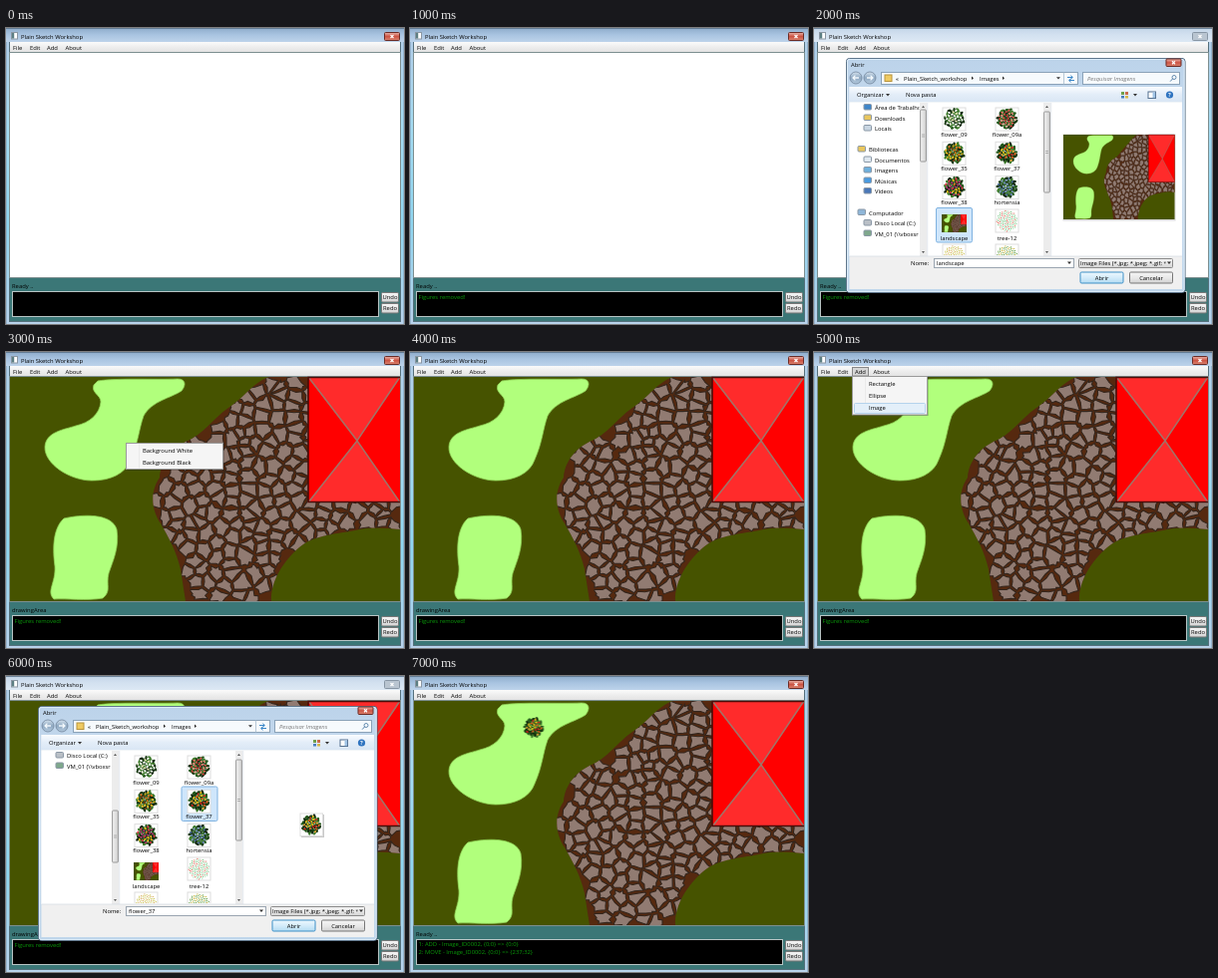
An HTML page that plays this animation: 399 px wide and 297 px high, repeating every 8 s.

```html
<!DOCTYPE html>
<html lang="pt">
<head>
<meta charset="utf-8">
<title>Canvas editor</title>
<style>
html, body { margin: 0; width: 100%; height: 100%; overflow: hidden; background: #b9d1ea; }
svg { display: block; width: 399px; height: 297px; }
text { font: 5.85px "Open Sans", "Noto Sans", sans-serif; fill: #000; white-space: pre; }
.mid { text-anchor: middle; }
.log text { fill: #0a9a0a; }
.step { animation: 8s step-end infinite; }
.modal { animation-name: modal; }
.first { animation-name: first; }
.second { animation-name: second; }
.scene { animation-name: scene; }
.context { animation-name: context; }
.menu { animation-name: menu; }
.ready { animation-name: ready; }
.area { animation-name: area; }
.removed { animation-name: removed; }
.moved { animation-name: moved; }
@keyframes modal { 0%, 37.5%, 87.5%, 100% { opacity: 0 } 25%, 75% { opacity: 1 } }
@keyframes first { 0%, 37.5%, 100% { opacity: 0 } 25% { opacity: 1 } }
@keyframes second { 0%, 87.5%, 100% { opacity: 0 } 75% { opacity: 1 } }
@keyframes scene { 0% { opacity: 0 } 37.5%, 100% { opacity: 1 } }
@keyframes context { 0%, 50%, 100% { opacity: 0 } 37.5% { opacity: 1 } }
@keyframes menu { 0%, 75%, 100% { opacity: 0 } 62.5% { opacity: 1 } }
@keyframes ready { 0%, 87.5%, 100% { opacity: 1 } 37.5% { opacity: 0 } }
@keyframes area { 0%, 87.5%, 100% { opacity: 0 } 37.5% { opacity: 1 } }
@keyframes removed { 0%, 87.5%, 100% { opacity: 0 } 12.5% { opacity: 1 } }
@keyframes moved { 0% { opacity: 0 } 87.5%, 100% { opacity: 1 } }
</style>
</head>
<body>
<svg id="stage" viewBox="0 0 399 297"></svg>
<script>
const rng = seed => () => (seed = (seed * 16807) % 2147483647) / 2147483647;
const each = (list, fn) => list.map(fn).join('');
const rect = (x, y, w, h, fill, stroke = 'none', more = '') =>
  `<rect x="${x}" y="${y}" width="${w}" height="${h}" fill="${fill}" stroke="${stroke}" ${more}/>`;
const path = (d, fill, stroke = 'none', width = 1) =>
  `<path d="${d}" fill="${fill}" stroke="${stroke}" stroke-width="${width}"/>`;
const text = (x, y, s, more = '') => `<text x="${x}" y="${y}" ${more}>${s}</text>`;
const group = (names, body) => `<g class="${names}">${body}</g>`;
const step = (name, body) => group('step ' + name, body);
const gradient = (id, stops, flat) =>
  `<linearGradient id="${id}" ${flat ? '' : 'x2="0" y2="1"'}>` +
  each(stops, (c, i) => `<stop offset="${i / (stops.length - 1)}" stop-color="${c}"/>`) + '</linearGradient>';
const arrow = (x, y, fill = '#333') => path(`M${x} ${y}h4l-2 2.4z`, fill);
const right = (x, y) => path(`M${x} ${y}l2 1.7l-2 1.7z`, '#222');
const button = (x, y, w, h, label, edge = '#777') =>
  rect(x, y, w, h, 'url(#button)', edge, 'rx="1.2"') + text(x + w / 2, y + h / 2 + 2.1, label, 'class="mid"');
const cross = (x, y, c) => path(`M${x - 1.5} ${y - 1.5}l3 3m0 -3l-3 3`, 'none', c, 1.1);
const closeBox = (x, y, w, h, fill, edge) =>
  rect(x, y, w, h, fill, edge, 'rx="1"') + cross(x + w / 2, y + h / 2, '#fff');

const road = 'M264 25C248 30 240 45 223 56C207 67 198 83 180 90C166 97 155 110 154 126' +
  'C143 142 147 160 155 172C163 186 171 200 175 218L180 250H266C265 230 278 210 294 196' +
  'C308 184 328 183 350 179C366 175 382 177 395 178V25Z';

// Paving: shrunken Voronoi cells on a jittered grid, with chipped edges
function stones() {
  const rand = rng(77), pts = [];
  const ctx = document.createElement('canvas').getContext('2d'), area = new Path2D(road);
  for (let row = 0; row < 21; row++)
    for (let col = 0; col < 17; col++)
      pts.push([142 + col * 16 + (row % 2) * 8 + (rand() - .5) * 14, 20 + row * 11.8 + (rand() - .5) * 10]);
  const cut = (poly, nx, ny, d) => poly.flatMap((p, i) => {
    const q = poly[(i + 1) % poly.length];
    const a = p[0] * nx + p[1] * ny - d, b = q[0] * nx + q[1] * ny - d, t = a / (a - b);
    const out = a <= 0 ? [p] : [];
    if (a * b < 0) out.push([p[0] + (q[0] - p[0]) * t, p[1] + (q[1] - p[1]) * t]);
    return out;
  });
  const chip = (poly, x, y) => poly.flatMap((p, i) => {
    const q = poly[(i + 1) % poly.length], out = [[p[0] + rand() - .5, p[1] + rand() - .5]];
    if (Math.hypot(q[0] - p[0], q[1] - p[1]) > 4) {
      const t = .3 + rand() * .4, pull = rand() * .3;
      const mx = p[0] + (q[0] - p[0]) * t, my = p[1] + (q[1] - p[1]) * t;
      out.push([mx + (x - mx) * pull, my + (y - my) * pull]);
    }
    return out;
  });
  return each(pts, ([x, y]) => {
    if (!ctx.isPointInPath(area, x, y)) return '';
    let cell = [[x - 11, y - 10], [x + 11, y - 10], [x + 11, y + 10], [x - 11, y + 10]];
    for (const [u, v] of pts) {
      const dx = u - x, dy = v - y, len = Math.hypot(dx, dy);
      if (!len || len > 40) continue;
      const nx = dx / len, ny = dy / len;
      cell = cut(cell, nx, ny, x * nx + y * ny + len / 2 - 1);
    }
    return cell.length > 2 ? 'M' + chip(cell, x, y).map(p => p.map(n => n.toFixed(1))).join('L') + 'Z' : '';
  });
}

function landscape() {
  return rect(4, 25, 391, 225, '#465300') +
    path('M92 29C110 26 150 28 172 27C180 27 181 33 176 39C166 46 146 49 138 64C133 78 133 90 125 108' +
      'C120 122 105 129 86 129C64 129 38 112 39 95C40 80 58 78 70 74C84 71 94 62 95 50C95 43 85 41 88 33Z',
      '#b1ff7c', '#8fcf55', .8) +
    path('M58 167C75 163 106 161 111 178C114 196 107 210 103 222C100 234 106 240 97 247C80 250 60 247 48 248' +
      'C40 240 50 232 49 215C47 200 46 178 58 167Z', '#b1ff7c', '#8fcf55', .8) +
    path(road, '#56290f') +
    `<g clip-path="url(#road)">${path(stones(), '#917b72', '#33251c', 1.1)}</g>` +
    rect(303, 25, 92, 126, '#f00') +
    path('M303 25H395L352 89ZM303 151H395L352 89Z', '#ff2b2b') +
    path('M303 25L352 89L395 25M303 151L352 89L395 151', 'none', '#a07468', 1.5) +
    path('M395 25.5H303V150.5H395', 'none', '#4a0c08', 1.6);
}
const scaled = (x, y, w, h) =>
  `<use href="#land" transform="translate(${x} ${y}) scale(${w / 391} ${h / 225}) translate(-4 -25)"/>`;

function flower(x, y, size, colors, seed) {
  const rand = rng(seed * 9973), blob = (n, reach, r, list) => {
    let out = '';
    for (let i = 0; i < n; i++) {
      const a = i * 2.4, d = Math.sqrt((i + .5) / n) * reach, c = list[Math.floor(rand() * list.length)];
      out += `<ellipse rx="${r}" ry="${r * .6}" fill="${c}" transform="translate(${(Math.cos(a) * d).toFixed(2)} ` +
        `${(Math.sin(a) * d).toFixed(2)}) rotate(${Math.round(rand() * 180)})"/>`;
    }
    return out;
  };
  return `<g transform="translate(${x} ${y}) scale(${size / 20})">` +
    blob(46, 9, 1.9, ['#16380f', '#24591b', '#0d260b', '#3c7a2a']) +
    blob(26, 8, 1.3, colors) + '</g>';
}

function tree(x, y, colors) {
  const rand = rng(515);
  let out = '';
  for (let i = 0; i < 110; i++) {
    const a = i * 2.4, d = Math.sqrt(i / 110) * 10.5;
    out += `<circle cx="${(x + Math.cos(a) * d).toFixed(1)}" cy="${(y + Math.sin(a) * d).toFixed(1)}" r=".6" ` +
      `fill="${colors[rand() < .3 ? 0 : 1]}"/>`;
  }
  return out;
}

const mixed = ['#f2c21b', '#e8601c', '#d1201c', '#1c4a14', '#e8a030'];
const thumbs = [
  ['flower_09', ['#fff', '#f6f2e4', '#efe6b8', '#fff']],
  ['flower_09a', ['#e05a50', '#f08a7c', '#c93a38', '#f4b0a4']],
  ['flower_35', ['#f2b91b', '#e0701c', '#c8a81c', '#7a3a14']],
  ['flower_37', mixed],
  ['flower_38', ['#e0344a', '#f2c21b', '#b02a70', '#e8781c']],
  ['hortensia', ['#5f7fae', '#7e97c2', '#48679a', '#4f7d4a']]
];
const colX = i => i % 2 ? 193.5 : 140.5;
const rowY = i => 91 + Math.floor(i / 2) * 34.3;

const files = () =>
  each(thumbs, ([name, colors], i) =>
    rect(colX(i) - 11.5, rowY(i) - 11, 23, 23, '#fff', '#ddd') +
    flower(colX(i), rowY(i), 22, colors, i + 3) +
    text(colX(i), rowY(i) + 17.8, name, 'class="mid"')) +
  scaled(128, 187, 25, 18) + text(140.5, 212.8, 'landscape', 'class="mid"') +
  rect(182, 182, 23, 23, '#fff', '#ddd') + tree(193.5, 193.5, ['#e06a5a', '#7cc98a']) +
  text(193.5, 212.8, 'tree-12', 'class="mid"') +
  `<g clip-path="url(#list)">${rect(129, 217, 23, 23, '#fff', '#ddd') + rect(182, 217, 23, 23, '#fff', '#ddd') +
    tree(140.5, 229, ['#d6a85a', '#c9c24a']) + tree(193.5, 229, ['#c9b030', '#5c9a3c'])}</g>`;

const scrollbar = (x, y, h, from, to) =>
  rect(x, y, 7, h, '#ececec') + path(`M${x + 2} ${y + 5}l1.5 -2l1.5 2zM${x + 2} ${y + h - 5}l1.5 2l1.5 -2z`, '#555') +
  rect(x + .6, from, 5.8, to - from, 'url(#thumb)', '#999', 'rx="1"') +
  path(`M${x + 2} ${(from + to) / 2 - 1}h3m-3 2h3`, 'none', '#777', .5);

const entry = ([label, x, y, color]) =>
  rect(x - 11, y - 5.5, 7.5, 5.5, color, '#8a97a5', 'rx="1"') + text(x, y, label);
const places = [
  ['Área de Trabalho', 61, 82, '#3f86c9'], ['Downloads', 61, 92.5, '#e9c65e'], ['Locais', 61, 103, '#c9d6e2'],
  ['Bibliotecas', 55, 124, '#e9c65e'], ['Documentos', 61, 134.5, '#dfe8f0'], ['Imagens', 61, 145, '#6fb0dd'],
  ['Músicas', 61, 155.5, '#4a9be0'], ['Vídeos', 61, 166, '#4a78b8'],
  ['Computador', 55, 187.5, '#8fb6d8'], ['Disco Local (C:)', 61, 198, '#b9bfc6'], ['VM_01 (\\\\vboxsr', 61, 208.5, '#7fa88c']
];
const drives = [['Disco Local (C:)', 61, 82, '#b9bfc6'], ['VM_01 (\\\\vboxsr', 61, 92.5, '#7fa88c']];
const picked = (x, y) => rect(x, y, 36, 34.5, '#cfe6fb', '#7fb2e0', 'rx="1.5"');
const sidebar = list => `<g clip-path="url(#side)">${each(list, entry)}</g>`;

const dialog = () =>
  rect(32.5, 30.5, 339.5, 235, 'url(#glass)', '#3f5870', 'rx="3"') +
  rect(33.3, 31.3, 337.9, 233.4, 'none', '#e2f0fb', 'rx="2.5"') +
  text(37, 39, 'Abrir') + closeBox(353, 31, 15, 7.5, 'url(#red)', '#6b2b25') +
  each([42, 56], x => `<circle cx="${x}" cy="50" r="6" fill="url(#round)" stroke="#71869c" stroke-width=".8"/>`) +
  path('M45 50h-6m2.4 -2.4l-2.4 2.4l2.4 2.4M53 50h6m-2.4 -2.4l2.4 2.4l-2.4 2.4', 'none', '#f4f9fd', 1.3) +
  rect(67.5, 44.5, 197, 12, '#f6fafd', '#8aa2b8') +
  rect(71, 47, 7, 6.5, '#efca62', '#b8933a') + text(82, 52.5, '«') +
  text(90, 52.5, 'Plain_Sketch_workshop') + right(158, 48.6) + text(166, 52.5, 'Images') + right(189, 48.6) +
  arrow(243, 49.2) + path('M250.5 44.5v12', 'none', '#a9bccd', .8) +
  path('M254 49.5h5m-1.6 -1.8l2 1.8l-2 1.8M261 52.5h-5m1.6 -1.8l-2 1.8l2 1.8', 'none', '#3a86c8', 1) +
  rect(269.5, 44.5, 97, 12, '#f6fafd', '#8aa2b8') +
  text(274, 52.5, 'Pesquisar Imagens', 'style="font-style:italic;fill:#777"') +
  `<circle cx="361" cy="49.5" r="2" fill="none" stroke="#5580a8" stroke-width=".9"/>` +
  path('M359.5 51l-2.4 2.6', 'none', '#5580a8', 1) +
  rect(35.5, 59, 333.5, 203, '#f0f0f0') +
  rect(35.5, 59, 333.5, 15.5, 'url(#tools)') +
  text(43, 69, 'Organizar') + arrow(72, 66) + text(92, 69, 'Nova pasta') +
  rect(308, 64, 3, 3, '#6fa04a') + rect(312, 64, 3, 3, '#c96a4a') + rect(308, 68, 3, 2.5, '#4a80c0') +
  rect(312, 68, 3, 2.5, '#d8b84a') + arrow(320, 66) +
  rect(335, 64, 7.5, 6.5, '#fff', '#55708f') + rect(339.5, 64.4, 2.6, 5.7, '#9fc3e6') +
  `<circle cx="356.5" cy="67" r="3.6" fill="#2f74c0"/>` +
  text(356.5, 69, '?', 'class="mid" style="fill:#fff;font-weight:700"') +
  rect(35.5, 74.5, 333.5, 154.5, '#fff') +
  step('first', picked(122.5, 180.5)) + step('second', picked(176, 111)) + files() +
  scrollbar(230, 75, 154, 84, 165) +
  path('M113.7 75v154M237.7 75v154', 'none', '#d9dfe6', .7) +
  step('first', sidebar(places) + scrollbar(106, 75, 154, 82, 134) +
    rect(249.5, 106.5, 113, 87, '#d8d8d8') + scaled(250, 107, 111.5, 85)) +
  step('second', sidebar(drives) + scrollbar(106, 75, 154, 135, 187) +
    rect(296, 139, 23, 23, '#c9c9c9') + rect(295, 138, 22.5, 22.5, '#fff', '#ddd') + flower(306, 149, 21, mixed, 6)) +
  path('M35.5 229h333.5', 'none', '#d5dbe2', .7) +
  text(97, 237.5, 'Nome:') + rect(120.5, 231.5, 140, 9, '#fff', '#9aa5b0') + arrow(254, 234.5) +
  step('first', text(123, 237.8, 'landscape')) + step('second', text(123, 237.8, 'flower_37')) +
  rect(265.5, 231.5, 94, 9, 'url(#button)', '#8a8a8a', 'rx="1"') +
  `<g clip-path="url(#filter)">${text(267, 237.8, 'Image Files (*.jpg; *.jpeg; *.gif; *.png)')}</g>` +
  arrow(354, 234.5) +
  rect(267, 245, 43, 11, 'url(#glow)', '#3c8fc6', 'rx="1.2"') + text(288.5, 252.6, 'Abrir', 'class="mid"') +
  button(316.5, 245, 43, 11, 'Cancelar');

const bar = (fill, closeFill, edge) =>
  rect(0, 0, 399, 14, fill) + path('M0 .5H399', 'none', '#5a7288', .8) +
  closeBox(379.5, 4.5, 15, 8, closeFill, edge) +
  rect(5.5, 4.5, 6, 6.5, '#fff', '#8b97a3') + rect(6, 5, 2.2, 5.5, '#5c7f83') +
  text(15, 10.8, 'Plain Sketch Workshop');

const popup = (x, y, w, h, gutter) =>
  rect(x + 1, y + 1, w, h, '#000', 'none', 'opacity=".35"') + rect(x, y, w, h, '#f5f5f5', '#9a9a9a') +
  path(`M${x + gutter} ${y + 1}v${h - 2}`, 'none', '#e6e6e6', .7);

document.getElementById('stage').innerHTML =
  '<defs>' +
  gradient('bar', ['#8eaccb', '#a9c4e1', '#bdd3ea']) +
  gradient('dim', ['#c3d5e8', '#d3e1f0', '#dce8f4']) +
  gradient('edge', ['#b4cde8', '#a5dcf2', '#8fd6f0', '#b9d3ec']) +
  gradient('glass', ['#bcd3ea', '#d0e1f1', '#bfd6eb']) +
  gradient('red', ['#e9b4aa', '#cc5444', '#da8470']) +
  gradient('round', ['#d5e2ee', '#8fa9c2', '#b4cade']) +
  gradient('tools', ['#fafcff', '#e3edf8', '#d9e6f4']) +
  gradient('button', ['#f5f5f5', '#e9e9e9', '#d2d2d2']) +
  gradient('glow', ['#eef8fe', '#d4ecfa', '#b4dcf2']) +
  gradient('strip', ['#fbfbfb', '#ededed', '#e2e2e2']) +
  gradient('thumb', ['#f4f4f4', '#cfcfcf'], true) +
  `<clipPath id="road"><path d="${road}"/></clipPath>` +
  `<clipPath id="list">${rect(114, 75, 116, 153)}</clipPath>` +
  `<clipPath id="side">${rect(36, 75, 69.5, 153)}</clipPath>` +
  `<clipPath id="filter">${rect(266, 231, 86.5, 9)}</clipPath>` +
  `<g id="land">${landscape()}</g></defs>` +
  rect(0, 0, 399, 297, 'url(#edge)') + path('M.4 0V297M398.6 0V297', 'none', '#7f9bb5', .6) +
  rect(3.5, 14.5, 392, 280, '#3b7777', '#55707c') +
  bar('url(#bar)', 'url(#red)', '#6b2b25') +
  step('modal', bar('url(#dim)', '#b9c5d1', '#8796a5')) +
  rect(4, 14, 391, 10.5, 'url(#strip)') +
  step('menu', rect(38.5, 15.5, 16, 8.5, '#d6d6d6', '#888')) +
  each([[7, 'File'], [24, 'Edit'], [41, 'Add'], [59.5, 'About']], ([x, s]) => text(x, 21.6, s)) +
  rect(3.5, 24.5, 392, 226, '#fff', '#7d8f90') +
  step('scene', '<use href="#land"/>') +
  step('ready', text(6, 260.5, 'Ready ..')) + step('area', text(6, 260.5, 'drawingArea')) +
  rect(6.5, 264.5, 367, 25, '#000', '#b8c4c4') +
  group('log', step('removed', text(8.5, 272.3, 'Figures removed!')) +
    step('moved', text(8.5, 270.8, '1: ADD - Image_ID0002, {0;0} =&gt; {0;0}') +
      text(8.5, 278.6, '2: MOVE - Image_ID0002, {0;0} =&gt; {237;32}'))) +
  button(376.5, 265.5, 17, 9.5, 'Undo') + button(376.5, 276.5, 17, 9.5, 'Redo') +
  step('moved', flower(124, 51.5, 21, mixed, 6)) +
  step('context', popup(120.5, 91.5, 97, 26, 13) +
    text(137, 100.8, 'Background White') + text(137, 112.8, 'Background Black')) +
  step('menu', popup(38.5, 24.5, 75, 38.5, 13) + rect(40.5, 51.5, 71, 10, '#e3eff9', '#b5d3ec', 'rx="1"') +
    each(['Rectangle', 'Ellipse', 'Image'], (s, i) => text(55, 33.6 + i * 12.1, s))) +
  step('modal', dialog());
</script>
</body>
</html>
```
